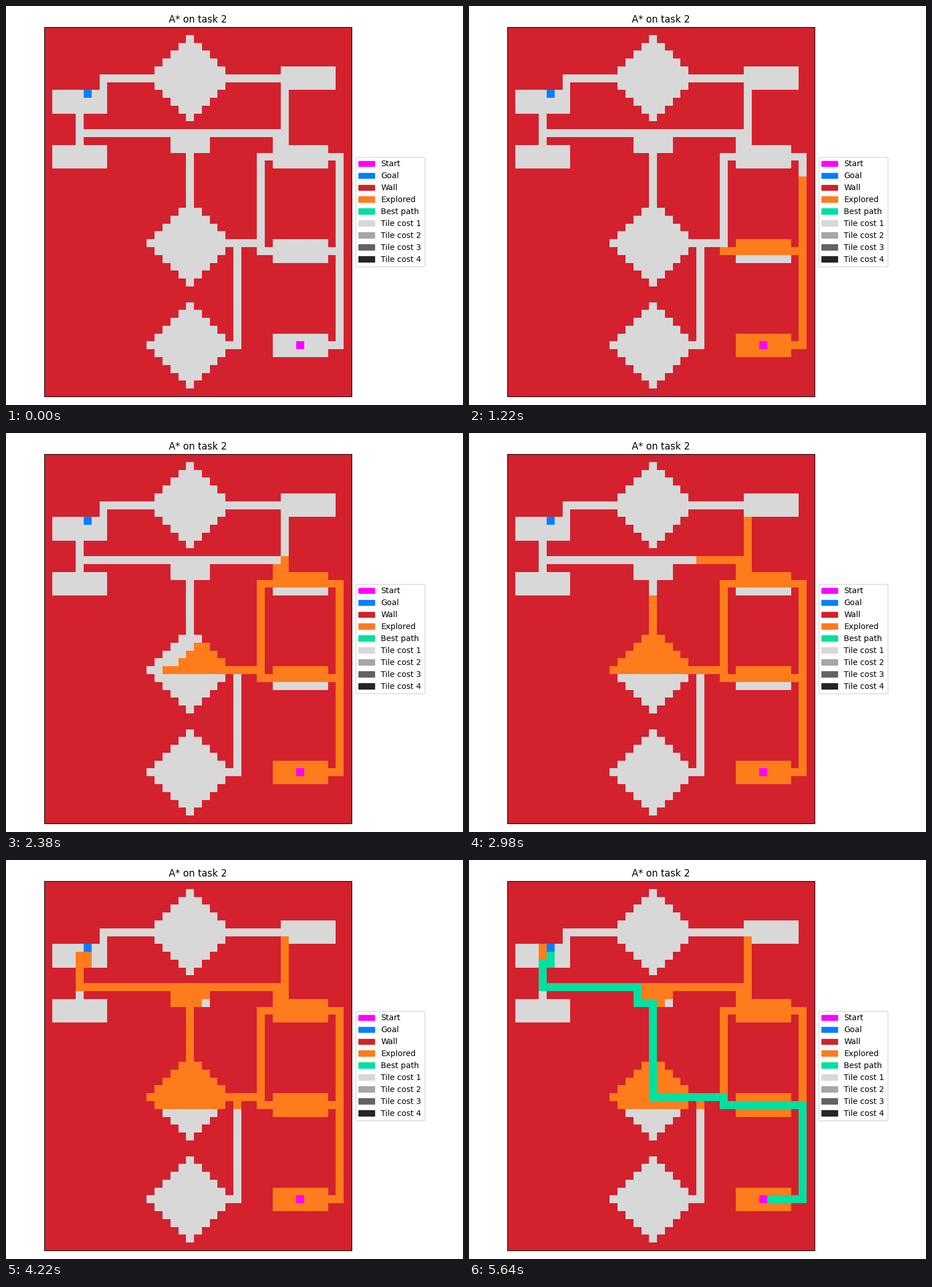
These frames come from a looping animation (800 by 700 pixels, 6640 ms). A matplotlib script:

```python
import itertools

import matplotlib.pyplot as plt
import numpy as np
from matplotlib.animation import FuncAnimation
from matplotlib.colors import to_rgb
from matplotlib.patches import Patch

WIDTH, HEIGHT, DPI = 800, 700, 100
COLS, ROWS = 39, 47
MAP_W, MAP_H = 538, 648
STEP_MS, FRAMES = 20, 332

LEGEND = {
    "Start": "#ff00ff",
    "Goal": "#0080ff",
    "Wall": "#d3212d",
    "Explored": "#ff7c1c",
    "Best path": "#00e0a0",
    "Tile cost 1": "#d8d8d8",
    "Tile cost 2": "#a6a6a6",
    "Tile cost 3": "#636363",
    "Tile cost 4": "#252525",
}

# Room centres as (column, row)
NORTH, MIDDLE, SOUTH = (18, 6), (18, 27), (18, 40)
NORTH_WEST, WEST = (4, 9), (4, 16)
NORTH_EAST, EAST, LOWER_EAST, SOUTH_EAST = (33, 6), (32, 16), (32, 28), (32, 40)
HALL = (18, 14)
START, GOAL = SOUTH_EAST, (5, 8)

# Each corridor leaves one point sideways, turns along a column and enters the other
CORRIDORS = [
    (NORTH, NORTH_EAST, 30),
    (NORTH, NORTH_WEST, 7),
    (NORTH_EAST, EAST, 30),
    (NORTH_WEST, WEST, 4),
    ((4, 13), (30, 13), 4),
    ((30, 14), EAST, 29),
    (HALL, MIDDLE, 18),
    (MIDDLE, LOWER_EAST, 27),
    (EAST, LOWER_EAST, 27),
    (MIDDLE, SOUTH, 24),
    (EAST, LOWER_EAST, 37),
    (LOWER_EAST, SOUTH_EAST, 37),
]


def rgb(name):
    return np.round(np.multiply(to_rgb(LEGEND[name]), 255)).astype(np.uint8)


def build_floor():
    floor = np.zeros((ROWS, COLS), bool)
    y, x = np.mgrid[:ROWS, :COLS]

    def carve(x0, y0, x1, y1):
        floor[min(y0, y1):max(y0, y1) + 1, min(x0, x1):max(x0, x1) + 1] = True

    def carve_room(center, reach):
        cx, cy = center
        carve(cx - reach, cy - 1, cx + reach, cy + 1)

    for cx, cy in (NORTH, MIDDLE, SOUTH):
        floor |= abs(x - cx) + abs(y - cy) <= 5
    for center in (NORTH_WEST, WEST, NORTH_EAST, EAST, LOWER_EAST, SOUTH_EAST):
        carve_room(center, 3)
    carve_room(HALL, 2)
    for (ax_, ay), (bx, by), turn in CORRIDORS:
        carve(ax_, ay, turn, ay)
        carve(turn, ay, turn, by)
        carve(turn, by, bx, by)
    return floor


def a_star(floor):
    """Return the expanded tiles in order and the path traced back from the goal."""
    def estimate(x, y):
        return abs(x - GOAL[0]) + abs(y - GOAL[1])

    order = itertools.count()
    frontier = [(estimate(*START), next(order), START)]
    cost, parent, explored = {START: 0}, {}, []
    while frontier:
        entry = min(frontier)
        frontier.remove(entry)
        tile = entry[2]
        if tile == GOAL:
            break
        if tile != START:
            explored.append(tile)
        x, y = tile
        for dx, dy in ((-1, 0), (1, 0), (0, -1), (0, 1)):
            near = (x + dx, y + dy)
            new_cost = cost[tile] + 1
            if floor[near[1], near[0]] and new_cost < cost.get(near, np.inf):
                cost[near], parent[near] = new_cost, tile
                frontier.append((new_cost + estimate(*near), next(order), near))

    path, tile = [], parent[GOAL]
    while tile != START:
        path.append(tile)
        tile = parent[tile]
    return explored, path


floor = build_floor()
explored, path = a_star(floor)
paints = [(tile, rgb("Explored")) for tile in explored]
paints += [(tile, rgb("Best path")) for tile in path]

base = np.empty((ROWS, COLS, 3), np.uint8)
base[:] = rgb("Wall")
base[floor] = rgb("Tile cost 1")
for (x, y), name in ((START, "Start"), (GOAL, "Goal")):
    base[y, x] = rgb(name)

# Tile under the centre of each map pixel, so tile edges land on whole pixels
pixel_rows = (np.arange(MAP_H) + 0.5) * ROWS // MAP_H
pixel_cols = (np.arange(MAP_W) + 0.5) * COLS // MAP_W
pixels = np.ix_(pixel_rows.astype(int), pixel_cols.astype(int))

fig = plt.figure(figsize=(WIDTH / DPI, HEIGHT / DPI), dpi=DPI)
ax = fig.add_axes([67.2 / WIDTH, 15 / HEIGHT, 537.7 / WIDTH, 647.72 / HEIGHT])
image = ax.imshow(base[pixels], interpolation="nearest", aspect="auto")
ax.set_xticks([])
ax.set_yticks([])
ax.set_title("A* on task 2")
ax.legend(handles=[Patch(color=color, label=label) for label, color in LEGEND.items()],
          loc="center left", bbox_to_anchor=(1, 0.5))


def update(frame):
    grid = base.copy()
    for (x, y), color in paints[:max(frame - 1, 0)]:
        grid[y, x] = color
    image.set_data(grid[pixels])
    return [image]


anim = FuncAnimation(fig, update, frames=FRAMES, interval=STEP_MS,
                     repeat=True, repeat_delay=0)
plt.show()
```
